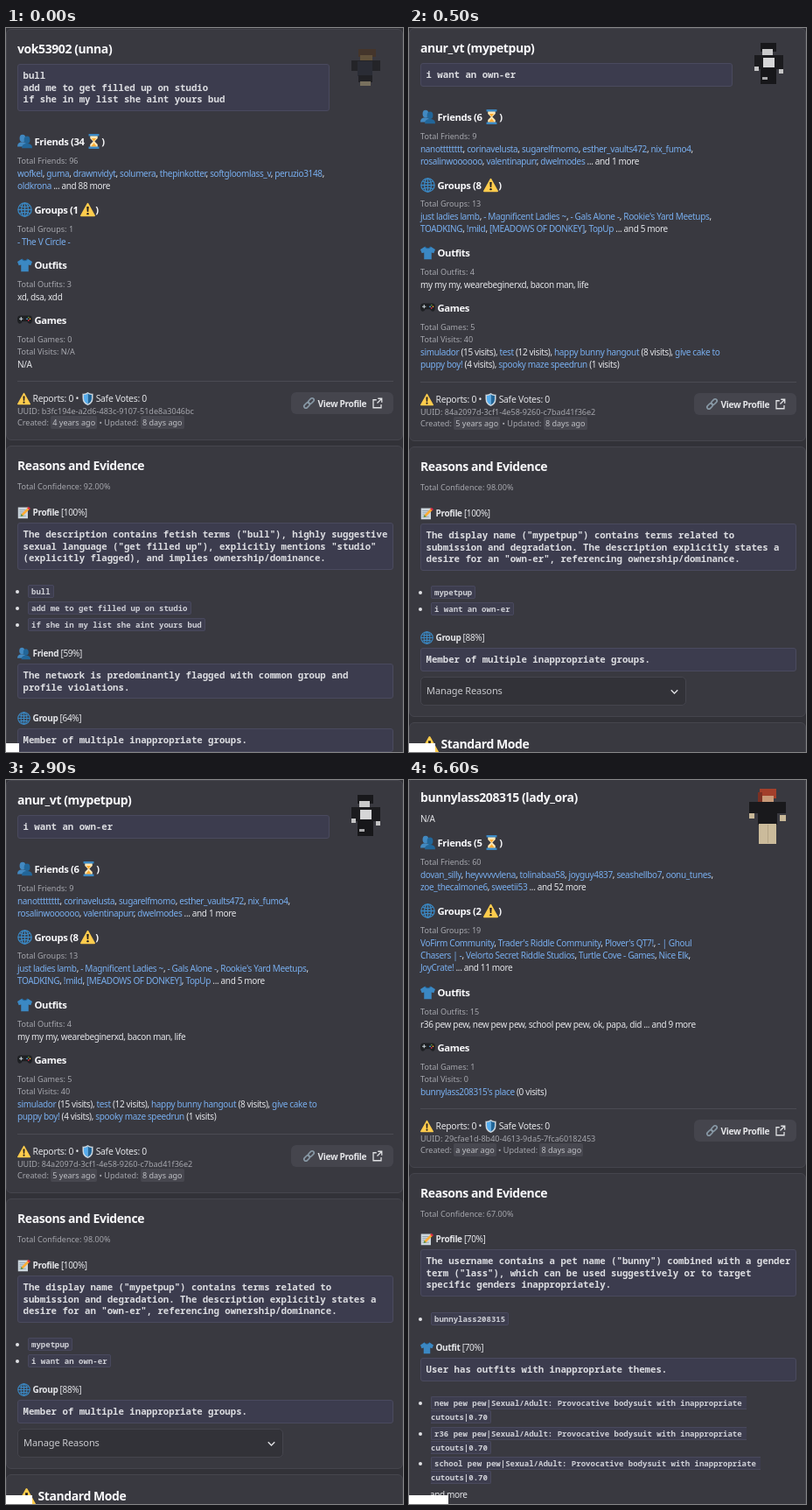
An HTML page that plays this animation: 454 px wide and 827 px high, repeating every 8 s.

```html
<!DOCTYPE html>
<html lang="en">
<head>
<meta charset="utf-8">
<title>Profile review</title>
<style>
html, body { margin: 0; width: 100%; height: 100%; overflow: hidden; background: #323238; }
#stage { position: relative; width: 454px; height: 827px; overflow: hidden; font-family: "Noto Sans", sans-serif; color: #e4e5e8; }
.screen { position: absolute; inset: 0; }
.screen > * { position: absolute; box-sizing: border-box; margin: 0; }
p { line-height: 16px; white-space: pre; }
p svg { width: 17px; height: 17px; vertical-align: middle; position: relative; top: -1px; }
p svg:first-child { margin-right: 2.5px; }
a { color: #78aeee; }
.title { font-size: 14px; font-weight: 800; letter-spacing: -.42px; color: #f8f8fa; }
.title svg { width: 21px; height: 21px; }
.head { font-size: 11.3px; font-weight: 800; letter-spacing: -.38px; color: #f8f8fa; }
.sub { font-size: 9.07px; color: #a6a7ad; }
.sub span { background: #47474f; color: #bfc0c5; padding: 1px 2px; border-radius: 2px; }
.body { font-size: 10px; font-weight: 500; letter-spacing: -.36px; }
.body svg, .votes svg { width: 15px; height: 15px; margin-right: 2px; }
.votes { font-size: 10.4px; font-weight: 500; letter-spacing: -.28px; }
.button { font-size: 10.2px; font-weight: 600; letter-spacing: -.38px; }
.button svg { width: 15px; height: 15px; }
.choice { font-size: 11px; font-weight: 500; letter-spacing: -.1px; color: #c9cace; }
.code, .chip { font-family: "Noto Sans Mono", monospace; font-weight: 600; }
.code { font-size: 10.7px; color: #dcdde1; }
.chip { font-size: 9.03px; color: #cfd0d6; }
.chip span { background: #3d3d4e; border: 1px solid #49495d; border-radius: 2px; padding: 0 3px; }
.panel { left: 0; width: 454px; background: #393940; border: 1px solid #45454d; border-radius: 6px; }
.block { left: 13px; background: #3c3c4e; border: 1px solid #4a4a5e; border-radius: 3px; }
.rule { left: 13px; width: 430px; height: 1px; background: #4b4b53; }
.key { left: 326px; width: 117px; height: 25px; background: #45454d; border-radius: 6px; }
.select { left: 13px; width: 304px; height: 33px; background: #323238; border: 1px solid #45454d; border-radius: 5px; }
.dot { left: 11px; width: 4px; height: 4px; border-radius: 2px; background: #e0e1e4; }
#bar { position: absolute; left: 0; bottom: 0; height: 10px; background: #fff; }
</style>
</head>
<body>
<div id="stage"></div>
<script>
// Icons share a 20 x 20 box.
const icons = {
  people: '<g fill="#4289c1"><ellipse cx="7" cy="6" rx="4" ry="5"/><path d="M0 17q0-6 7-6t7 6z"/></g><g fill="#226699"><ellipse cx="13" cy="8" rx="4" ry="5"/><path d="M6 19q0-6 7-6t7 6z"/></g>',
  glass: '<path fill="#ffe8b6" d="M5 2h10v4l-4 4 4 4v4H5v-4l4-4-4-4z"/><path fill="#ffac33" d="M7 6h6l-3 4zM10 12l4 5H6z"/><path fill="#3b88c3" d="M3 0h14v3H3zM3 17h14v3H3z"/>',
  globe: '<g fill="none" stroke="#3b88c3" stroke-width="1.5"><circle cx="10" cy="10" r="9"/><ellipse cx="10" cy="10" rx="4.6" ry="9"/><path d="M10 1v18M1 10h18M3 5q7 3 14 0M3 15q7-3 14 0"/></g>',
  warn: '<path fill="#ffcc4d" stroke="#ffcc4d" stroke-width="2" stroke-linejoin="round" d="M10 2l9 16H1z"/><path fill="#231f20" d="M8.6 6h2.8l-.5 7H9.1z"/><circle cx="10" cy="15.5" r="1.4" fill="#231f20"/>',
  shirt: '<path fill="#3b88c3" d="M6 2L0 6l2 5 3-1v9h10v-9l3 1 2-5-6-4q-4 4-8 0z"/><path fill="none" stroke="#226699" stroke-width="1.2" d="M6 2q4 5 8 0"/>',
  pad: '<path fill="#1e2023" d="M4 4h12q4 0 4 5t-3 6q-2 0-4-3H7q-2 3-4 3-3-1-3-6t4-5z"/><path stroke="#ccd6dd" stroke-width="1.2" d="M5 6v5M2.5 8.5h5"/><circle cx="15" cy="6.5" r="1" fill="#5c913b"/><circle cx="15" cy="10.5" r="1" fill="#dd2e44"/><circle cx="13" cy="8.5" r="1" fill="#55acee"/><circle cx="17" cy="8.5" r="1" fill="#ffac33"/>',
  shield: '<path fill="#ccd6dd" d="M10 0q4 3 8 2v7q0 8-8 11-8-3-8-11V2q4 1 8-2z"/><path fill="#226699" d="M10 2q3 2 6 2v5q0 6-6 9z"/><path fill="#55acee" d="M10 2Q7 4 4 4v5q0 6 6 9z"/>',
  memo: '<path fill="#ccd6dd" d="M1 2h15v17H1z"/><path stroke="#8899a6" d="M3 6h10M3 9h8M3 12h5M3 15h10"/><path stroke="#ffac33" stroke-width="3.4" d="M7 14L17 4"/><path fill="#dd2e44" d="M15 3l2-2 3 3-2 2z"/><path fill="#5c913b" d="M5 16l1-4 3 3z"/>',
  link: '<g fill="none" stroke="#8899a6" stroke-width="2.2"><rect x="-4" y="-2.8" width="10" height="5.6" rx="2.8" transform="translate(12.5 7.5) rotate(-45)"/><rect x="-6" y="-2.8" width="10" height="5.6" rx="2.8" transform="translate(7.5 12.5) rotate(-45)"/></g>',
  open: '<path fill="none" stroke="#e0e1e4" stroke-width="1.7" d="M9 5H4v12h12v-5M11 3h6v6M17 3l-7 7"/>',
  down: '<path fill="none" stroke="#e0e1e4" stroke-width="1.8" d="M5 7l5 5 5-5"/>'
};

// Block figures: [colour, x, y, width, height], relative to x = 388.
const screens = [
  {
    top: 1, name: "vok53902 (unna)", bio: ["bull", "add me to get filled up on studio", "if she in my list she aint yours bud"],
    figure: [["#44352b", 15, 24, 20, 9], ["#62523b", 17, 31, 14, 6], ["#242428", 7, 37, 33, 12], ["#2a2c35", 14, 38, 17, 17], ["#212125", 15, 54, 16, 8], ["#78705e", 17, 61, 12, 5]],
    sections: [
      [130, ":people:Friends (34 :glass:)", ["Total Friends: 96"], ["{wofkel}, {guma}, {drawnvidyt}, {solumera}, {thepinkotter}, {softgloomlass_v}, {peruzio3148},", "{oldkrona} ... and 88 more"]],
      [208, ":globe:Groups (1 :warn:)", ["Total Groups: 1"], ["{- The V Circle -}"]],
      [271, ":shirt:Outfits", ["Total Outfits: 3"], ["xd, dsa, xdd"]],
      [334, ":pad:Games", ["Total Games: 0", "Total Visits: N/A"], ["N/A"]]
    ],
    rule: 403, uuid: "b3fc194e-a2d6-483c-9107-51de8a3046bc", created: "4 years ago", confidence: "92.00%",
    reasons: [
      [553, ":memo:<b>Profile</b> [100%]", ['The description contains fetish terms ("bull"), highly suggestive', 'sexual language ("get filled up"), explicitly mentions "studio"', "(explicitly flagged), and implies ownership/dominance."]],
      [714, ":people:<b>Friend</b> [59%]", ["The network is predominantly flagged with common group and", "profile violations."]],
      [788, ":globe:<b>Group</b> [64%]", ["Member of multiple inappropriate groups."]]
    ],
    chips: [[644, "bull"], [663, "add me to get filled up on studio"], [682, "if she in my list she aint yours bud"]]
  },
  {
    top: 0, name: "anur_vt (mypetpup)", bio: ["i want an own-er"],
    figure: [["#18181b", 14, 17, 18, 10], ["#c9c9ca", 16, 24, 12, 7], ["#1b1b1e", 7, 31, 33, 16], ["#d6d6d7", 17, 34, 13, 11], ["#c4c4c5", 7, 44, 5, 5], ["#c4c4c5", 35, 47, 5, 5], ["#17171a", 14, 46, 18, 18], ["#aaaaac", 16, 56, 6, 3]],
    sections: [
      [102, ":people:Friends (6 :glass:)", ["Total Friends: 9"], ["{nanotttttttt}, {corinavelusta}, {sugarelfmomo}, {esther_vaults472}, {nix_fumo4},", "{rosalinwoooooo}, {valentinapurr}, {dwelmodes} ... and 1 more"]],
      [179.5, ":globe:Groups (8 :warn:)", ["Total Groups: 13"], ["{just ladies lamb}, {- Magnificent Ladies ~}, {- Gals Alone -}, {Rookie's Yard Meetups},", "{TOADKING}, {!mild}, {[MEADOWS OF DONKEY]}, {TopUp} ... and 5 more"]],
      [257, ":shirt:Outfits", ["Total Outfits: 4"], ["my my my, wearebeginerxd, bacon man, life"]],
      [320, ":pad:Games", ["Total Games: 5", "Total Visits: 40"], ["{simulador} (15 visits), {test} (12 visits), {happy bunny hangout} (8 visits), {give cake to}", "{puppy boy!} (4 visits), {spooky maze speedrun} (1 visits)"]]
    ],
    rule: 404, uuid: "84a2097d-3cf1-4e58-9260-c7bad41f36e2", created: "5 years ago", confidence: "98.00%",
    reasons: [
      [554, ":memo:<b>Profile</b> [100%]", ['The display name ("mypetpup") contains terms related to', "submission and degradation. The description explicitly states a", 'desire for an "own-er", referencing ownership/dominance.']],
      [696, ":globe:<b>Group</b> [88%]", ["Member of multiple inappropriate groups."]]
    ],
    chips: [[645, "mypetpup"], [664, "i want an own-er"]],
    end: 787
  },
  {
    top: -3, name: "bunnylass208315 (lady_ora)", bio: [],
    figure: [["#a33f2b", 13, 10, 19, 11], ["#7b3023", 11, 14, 5, 12], ["#c99a78", 16, 18, 13, 7], ["#19191c", 1, 25, 42, 13], ["#19191c", 11, 28, 22, 23], ["#c8b898", 1, 38, 6, 6], ["#c8b898", 36, 40, 7, 7], ["#cbbb9b", 12, 50, 20, 23], ["#b4a486", 22, 51, 1, 21]],
    sections: [
      [72, ":people:Friends (5 :glass:)", ["Total Friends: 60"], ["{dovan_silly}, {heyvvvvvlena}, {tolinabaa58}, {joyguy4837}, {seashellbo7}, {oonu_tunes},", "{zoe_thecalmone6}, {sweetii53} ... and 52 more"]],
      [150, ":globe:Groups (2 :warn:)", ["Total Groups: 19"], ["{VoFirm Community}, {Trader's Riddle Community}, {Plover's QT7!}, {- | Ghoul}", "{Chasers | -}, {Velorto Secret Riddle Studios}, {Turtle Cove - Games}, {Nice Elk},", "{JoyCrate!} ... and 11 more"]],
      [243, ":shirt:Outfits", ["Total Outfits: 15"], ["r36 pew pew, new pew pew, school pew pew, ok, papa, did ... and 9 more"]],
      [306, ":pad:Games", ["Total Games: 1", "Total Visits: 0"], ["{bunnylass208315's place} (0 visits)"]]
    ],
    rule: 375, uuid: "29cfae1d-8b40-4613-9da5-7fca60182453", created: "a year ago", confidence: "67.00%",
    reasons: [
      [524, ":memo:<b>Profile</b> [70%]", ['The username contains a pet name ("bunny") combined with a gender', 'term ("lass"), which can be used suggestively or to target', "specific genders inappropriately."]],
      [648, ":shirt:<b>Outfit</b> [70%]", ["User has outfits with inappropriate themes."]]
    ],
    chips: [[616, "bunnylass208315"], ...[["new", 712], ["r36", 746.5], ["school", 781]].map(([kind, y]) =>
      [y, kind + " pew pew|Sexual/Adult: Provocative bodysuit with inappropriate \ncutouts|0.70"])],
    more: 816
  }
];

const icon = name => `<svg viewBox="0 0 20 20">${icons[name]}</svg>`;
const rich = s => s.replace(/:(\w+):/g, (_, name) => icon(name)).replace(/{(.+?)}/g, "<a>$1</a>");
// y is the middle of the line.
const text = (kind, y, s, x = 13) => `<p class="${kind}" style="left:${x}px;top:${y - 8}px">${rich(s)}</p>`;
const box = (kind, top, size = "") => `<div class="${kind}" style="top:${top}px;${size}"></div>`;
const panel = (top, end) => box("panel", top, `height:${end - top}px`);
const block = (top, lines, width) =>
  box("block", top, `width:${width}px;height:${Math.floor(lines.length * 13.5 + 13.5)}px`) +
  lines.map((s, i) => text("code", top + 13 + i * 13.6, s, 19.5)).join("");

function section([y, heading, totals, lines]) {
  const rows = [...totals.map(s => ["sub", s]), ...lines.map(s => ["body", s])];
  return text("head", y, heading) + rows.map(([kind, s], i) => text(kind, y + 21.7 + i * 14, s)).join("");
}

function build(s) {
  const r = s.rule, bioTop = s.top + 40;
  const figure = s.figure.map(([fill, x, y, w, h]) => `<rect fill="${fill}" x="${x}" y="${y}" width="${w}" height="${h}"/>`).join("");
  return [
    panel(s.top, r + 67.5), panel(r + 74, s.end || 850),
    text("title", s.top + 23, s.name),
    s.bio.length ? block(bioTop, s.bio, 357) : text("body", 44, "N/A"),
    `<svg style="left:388px;top:0" width="48" height="80">${figure}</svg>`,
    ...s.sections.map(section),
    box("rule", r),
    text("votes", r + 20, ":warn:Reports: 0 • :shield:Safe Votes: 0"),
    text("sub", r + 34.5, "UUID: " + s.uuid),
    text("sub", r + 47.5, `Created: <span>${s.created}</span> • Updated: <span>8 days ago</span>`),
    box("key", r + 13),
    text("button", r + 25.5, ":link:View Profile", 339),
    text("button", r + 25.5, ":open:", 417),
    text("title", r + 97, "Reasons and Evidence"),
    text("sub", r + 120.5, "Total Confidence: " + s.confidence),
    ...s.reasons.map(([y, label, lines]) => text("body", y, label) + block(y + 12, lines, 430)),
    ...s.chips.map(([y, label]) => box("dot", y - 2) + text("chip", y, `<span>${label}</span>`, 25)),
    s.more ? text("body", s.more, "and more", 24) : "",
    s.end ? box("select", 741) + text("choice", 757, "Manage Reasons", 20) + text("button", 758, ":down:", 296)
      + panel(793, 850) + text("title", 817, ":warn:Standard Mode") : ""
  ].join("");
}

const stage = document.getElementById("stage");
stage.innerHTML = screens.map(s => `<div class="screen">${build(s)}</div>`).join("") + '<div id="bar"></div>';
const views = [...stage.querySelectorAll(".screen")];
const bar = document.getElementById("bar");

const start = performance.now();
function draw() {
  const t = (performance.now() - start) % 8000;
  const current = t < 500 ? 0 : t < 4500 ? 1 : 2;
  views.forEach((view, i) => view.style.display = i === current ? "block" : "none");
  bar.style.width = 15 * (current + 1) + "px";
  requestAnimationFrame(draw);
}
draw();
</script>
</body>
</html>
```
